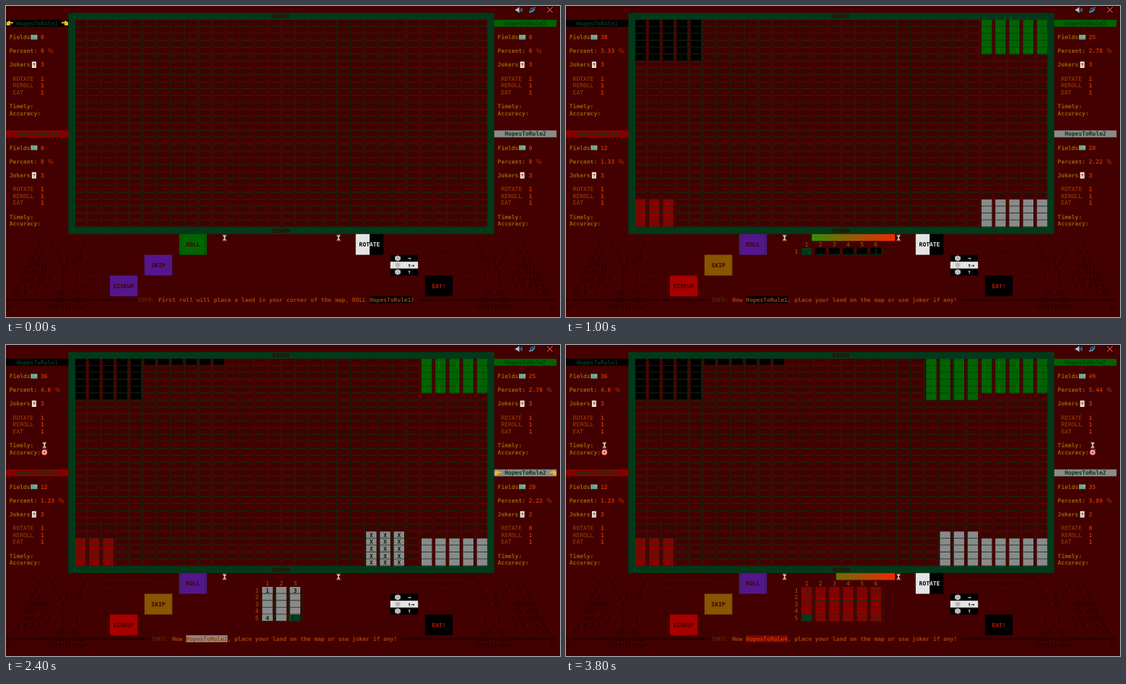
Recreate the animation shown at these times as an HTML page with a canvas. Size 768 px wide and 432 px high, loop 4000 ms.

```html
<!DOCTYPE html>
<html lang="en">
<head>
<meta charset="utf-8">
<title>Land game</title>
<style>
html, body { margin: 0; width: 100%; height: 100%; overflow: hidden; background: #430000; }
canvas { display: block; width: 768px; height: 432px; }
</style>
</head>
<body>
<canvas id="stage" width="768" height="432"></canvas>
<script>
const ctx = document.getElementById('stage').getContext('2d');
const CW = 4.8, CH = 9.6, COLS = 159, LOOP = 4000;
const BG = '#430000', GREEN = '#003a1a', LABEL = '#9a6000', VALUE = '#c83200', TEXT = '#a84000';
const INK = '#000000', PURPLE = '#54168c';
const COLOR = { 1: '#000000', 2: '#8a8a8a', 3: '#006400', 4: '#860000' };
const FONT = '7.973px "DejaVu Sans Mono", monospace';
const nameOf = n => 'HopesToRule' + n;

// owner, column, row, width, height, time placed
const blocks = [
  [1, 0, 0, 5, 6, 200], [2, 25, 26, 5, 4, 400], [3, 25, 0, 5, 5, 600], [4, 0, 26, 3, 4, 800],
  [1, 5, 0, 6, 1, 1200], [2, 22, 25, 3, 5, 2800], [3, 21, 0, 4, 6, 3400]
];
// time, player, rolled size, elapsed timer steps, pointer shown, preview column
const turns = [
  [0, 1, null, -1, true], [200, 2, null, -1, true], [400, 3, null, -1, true], [600, 4, null, -1, true],
  [800, 1, null, 0, true], [1000, 1, [6, 1], 1, false],
  [1200, 2, null, 0, true], [1600, 2, [5, 3], 3, true], [1800, 2, [5, 3], 4, true],
  [2000, 2, [3, 5], -1, true], [2200, 2, [3, 5], -1, true, 20],
  [2400, 2, [3, 5], -1, true, 21], [2600, 2, [3, 5], -1, true, 22],
  [2800, 3, null, 0, true], [3200, 3, [4, 6], 1, false],
  [3400, 4, null, 0, true], [3800, 4, [6, 5], 2, false]
];
const ROTATED_AT = 2000;

const scenery = String.raw`          .-.          .------------------------
         /   \        /    ---------------
        / /   \  __  /    -----------
       / /     \ (__)/   ---------
      //////    \/ '    ---------
     //// //    :   :  ------
    //// // /   |   | ----
   / / / / /    '   '---
  // /  /      //..\\

//          '///||||\\\'`.split('\n');
const SWAP = { '/': '\\', '\\': '/', '(': ')', ')': '(' };
const mirror = s => [...s.padEnd(COLS)].reverse().map(c => SWAP[c] || c).join('');
const feet = '='.repeat(14) + 'UU====UU';
const ground = feet.padEnd(COLS - feet.length, '=') + mirror(feet).trim();

function box(col, row, w, h, color) {
  ctx.fillStyle = color;
  ctx.fillRect(col * CW, row * CH, w * CW, h * CH);
}
function text(s, col, row, color, weight = 'bold') {
  ctx.font = weight + ' ' + FONT;
  ctx.fillStyle = color;
  ctx.fillText(s, col * CW, row * CH + 7.6);
}
function poly(points, color) {
  ctx.fillStyle = color;
  ctx.beginPath();
  for (let i = 0; i < points.length; i += 2) ctx.lineTo(points[i], points[i + 1]);
  ctx.fill();
}
function disc(x, y, r, color) {
  ctx.fillStyle = color;
  ctx.beginPath();
  ctx.arc(x, y, r, 0, Math.PI * 2);
  ctx.fill();
}
function stroke(points, color, width) {
  ctx.strokeStyle = color;
  ctx.lineWidth = width;
  ctx.beginPath();
  for (let i = 0; i < points.length; i += 2) ctx.lineTo(points[i], points[i + 1]);
  ctx.stroke();
}
function icon(draw, x, y, flip = 1) {
  ctx.save();
  ctx.translate(x, y);
  ctx.scale(flip, 1);
  draw();
  ctx.restore();
}

const icons = {
  hand() {
    ctx.fillStyle = '#f5b82a';
    ctx.fillRect(-4.5, -2, 5, 5);
    ctx.fillRect(-1, -1.7, 5.6, 1.9);
    poly([-3, -2, -0.5, -3.9, 0.6, -3, -0.5, -1], '#f5b82a');
    stroke([-0.5, 0.8, 1.5, 0.8], '#c47d10', 0.6);
    stroke([-0.5, 2, 1, 2], '#c47d10', 0.6);
  },
  map() {
    ctx.fillStyle = '#5fa9b8';
    ctx.fillRect(-4.6, -3.2, 9.2, 6.6);
    poly([-4, -2.5, -0.6, -2.5, -1.4, 0.2, -2.6, 2.4], '#8fb565');
    poly([0, -2, 4, -2.6, 3.4, 0.2, 1.4, 2], '#b7b75c');
    stroke([-1.5, -3.2, -1.5, 3.4], '#356c80', 0.4);
    stroke([1.6, -3.2, 1.6, 3.4], '#356c80', 0.4);
  },
  card() {
    ctx.fillStyle = '#e6e2de';
    ctx.fillRect(-3, -4.4, 6, 8.8);
    poly([-1.8, -1, 0, -2.8, 1.8, -1, 1, 1], '#b8554a');
    disc(0, 1.2, 1.2, '#c9a36a');
  },
  glass() {
    poly([-2.6, -3.6, 2.6, -3.6, 0.4, 0, 2.6, 3.6, -2.6, 3.6, -0.4, 0], '#d9d3cc');
    poly([-1.7, 3.2, 0, 1.2, 1.7, 3.2], '#e0a040');
    stroke([-3, -4, 3, -4], '#9a5c40', 1);
    stroke([-3, 4, 3, 4], '#9a5c40', 1);
  },
  target() {
    disc(0, 0.3, 4.3, '#d8302a');
    disc(0, 0.3, 3, '#eeeeee');
    disc(0, 0.3, 1.8, '#d8302a');
    stroke([0, 0.3, 4, -3.8], '#4a9ac8', 0.9);
  },
  die() {
    poly([0, -4, 3.8, -2.2, 3.8, 2.2, 0, 4, -3.8, 2.2, -3.8, -2.2], '#d8d8d8');
    stroke([-3.8, -2.2, 0, -0.4, 3.8, -2.2], '#8c8c8c', 0.6);
    stroke([0, -0.4, 0, 4], '#8c8c8c', 0.6);
    disc(0, -2.2, 0.6, '#702020');
    disc(-1.9, 1, 0.6, '#404040');
    disc(1.9, 1, 0.6, '#404040');
  },
  speaker() {
    poly([-4.5, -1.6, -2.6, -1.6, 0.6, -4.2, 0.6, 4.2, -2.6, 1.6, -4.5, 1.6], '#a9c4d4');
    ctx.strokeStyle = '#3f9fd8';
    ctx.lineWidth = 1;
    for (const r of [2, 3.8]) {
      ctx.beginPath();
      ctx.arc(0.6, 0, r, -0.9, 0.9);
      ctx.stroke();
    }
  },
  notes() {
    stroke([-2.5, 2.6, -2.5, -2, 0.3, -2.8, 0.3, 1.8], '#3d9ccc', 0.9);
    stroke([2.3, 0, 2.3, -4, 4, -2.8], '#3d9ccc', 0.9);
    disc(-3.4, 2.8, 1.3, '#3d9ccc');
    disc(-0.6, 2, 1.3, '#3d9ccc');
    disc(1.5, 0.2, 1.2, '#3d9ccc');
  },
  cross() {
    ctx.fillStyle = '#180000';
    ctx.fillRect(-5, -5, 10.4, 9.6);
    stroke([-3.8, -3.8, 3.8, 3.8], '#e02a2a', 1.7);
    stroke([3.8, -3.8, -3.8, 3.8], '#e02a2a', 1.7);
  }
};

function cell(col, row, color) {
  if (color) box(col, row, 3, 1, color);
  ctx.fillStyle = GREEN;
  ctx.fillRect(col * CW, row * CH + 8.7, 3 * CW, 0.9);
}
function divider(col, row, h) {
  ctx.fillStyle = GREEN;
  ctx.fillRect((col + 3.5) * CW - 0.35, row * CH, 0.7, h * CH);
}

function board(t, turn) {
  box(18, 1, 123, 32, GREEN);
  box(20, 2, 119, 30, BG);
  text('BOARD', 77, 1, BG);
  text('BOARD', 77, 32, BG);
  for (let c = 0; c < 30; c++) {
    for (let r = 0; r < 30; r++) cell(20 + c * 4, 2 + r);
    if (c < 29) divider(20 + c * 4, 2, 30);
  }
  const fill = (owner, c0, r0, w, h, mark) => {
    for (let c = c0; c < c0 + w; c++) for (let r = r0; r < r0 + h; r++) {
      cell(20 + c * 4, 2 + r, COLOR[owner]);
      if (mark) text(mark, 21 + c * 4, 2 + r, '#101a10');
    }
  };
  for (const [owner, c, r, w, h, at] of blocks) if (t >= at) fill(owner, c, r, w, h);
  const [, who, size, , , preview] = turn;
  if (preview) fill(who, preview, 30 - size[1], size[0], size[1], 'X');
}

function percent(fields) {
  const v = +(fields / 9).toFixed(2);
  return v && Number.isInteger(v) ? v.toFixed(1) : String(v);
}

function panel(n, col, row, t, turn) {
  const mine = blocks.filter(b => b[0] === n && t >= b[5]);
  const fields = mine.reduce((sum, b) => sum + b[3] * b[4], 0);
  const spent = n === 2 && t >= ROTATED_AT ? 1 : 0;
  const at = (c, r) => [(col + c) * CW, (row + r + 0.5) * CH];

  box(col, row, 18, 1, COLOR[n]);
  text(nameOf(n), col + 3, row, GREEN);
  if (turn[1] === n && turn[4]) {
    icon(icons.hand, ...at(1.1, 0));
    icon(icons.hand, ...at(17, 0), -1);
  }
  const line = (r, label, value, color = LABEL, indent = 1, weight) => {
    text(label, col + indent, row + r, color, weight);
    text(String(value), col + 10, row + r, VALUE);
  };
  const share = percent(fields);
  line(2, 'Fields', fields);
  line(4, 'Percent:', share);
  ctx.font = '8px "Noto Sans CJK JP", "Noto Sans CJK", sans-serif';
  ctx.fillText('％', (col + 11.1 + share.length) * CW, (row + 4) * CH + 7.6);
  line(6, 'Jokers', 3 - spent);
  line(8, 'ROTATE', 1 - spent, TEXT, 2, 'normal');
  line(9, 'REROLL', 1, TEXT, 2, 'normal');
  line(10, 'EAT', 1, TEXT, 2, 'normal');
  line(12, 'Timely:', '');
  line(13, 'Accuracy:', '');
  icon(icons.map, ...at(8.1, 2));
  icon(icons.card, ...at(8.1, 6));
  if (mine.length > 1 && n !== 2) {
    icon(icons.glass, ...at(11.1, 12));
    icon(icons.target, ...at(11.1, 13));
  }
}

function button(label, col, row, color, ink = BG) {
  box(col, row, 8, 3, color);
  text(label, col + (8 - label.length) / 2, row + 1, ink);
}

function controls(t, turn) {
  const [, who, size] = turn;
  button('ROLL', 50, 33, size ? PURPLE : COLOR[3]);
  for (let i = 0; i < 3; i++) {
    text('|', 50, 33 + i, GREEN, 'normal');
    text('|', 57, 33 + i, GREEN, 'normal');
  }
  button('SKIP', 40, 36, size ? '#865600' : PURPLE);
  button('GIVEUP', 30, 39, size ? '#a60000' : PURPLE);
  if (!(who === 2 && t >= ROTATED_AT)) {
    box(101, 33, 4, 3, '#e4e4e4');
    box(105, 33, 4, 3, '#000');
    text('ROT', 102, 34, '#000');
    text('ATE', 105, 34, '#e4e4e4');
  }
  ['→', '↑→', '↑'].forEach((arrows, i) => {
    const light = i === 1;
    box(111, 36 + i, 8, 1, light ? '#e4e4e4' : '#000');
    icon(icons.die, 543, (36.5 + i) * CH);
    text(arrows, 116, 36 + i, light ? '#000' : '#e4e4e4');
  });
  button('EAT!', 121, 39, '#000', '#b41c00');
}

function timer(step) {
  if (step >= 0) {
    const g = ctx.createLinearGradient(64 * CW, 0, 95 * CW, 0);
    g.addColorStop(0, '#00b000');
    g.addColorStop(0.5, '#7c6800');
    g.addColorStop(1, '#f02800');
    box(64 + step * 7, 33, 31 - step * 7, 1, g);
  }
  icon(icons.glass, 303, 322);
  icon(icons.glass, 461, 322);
}

function rolled(who, [w, h]) {
  const left = 80 - 2 * w, top = 35;
  for (let c = 0; c < w; c++) {
    text(String(c + 1), left + 1 + c * 4, top - 1, LABEL, 'normal');
    for (let r = 0; r < h; r++) cell(left + c * 4, top + r, COLOR[who]);
    divider(left + c * 4, top, h);
  }
  for (let r = 0; r < h; r++) text(String(r + 1), left - 2, top + r, LABEL, 'normal');
  const corner = { 1: [0, 0], 3: [w - 1, 0], 4: [0, h - 1], 2: [w - 1, h - 1] };
  const spot = n => [left + corner[n][0] * 4, top + corner[n][1]];
  for (const n of [1, 3, 4, 2]) {
    const [c, r] = spot(n);
    cell(c, r, COLOR[who]);
    text(String(n), c + 1, r, who === 2 ? '#101a10' : GREEN);
  }
  cell(...spot(who), GREEN);
}

function info(t, turn) {
  const [, who, size] = turn;
  const [before, after] = size
    ? ['Now ', ', place your land on the map or use joker if any!']
    : t < 800
      ? ['First roll will place a land in your corner of the map, ROLL ', '!']
      : ['It is your turn ', ', ROLL!'];
  const name = nameOf(who), length = 6 + before.length + name.length + after.length;
  const start = Math.floor((156 - length) / 2), end = start + length + 1;
  text(ground.slice(0, start), 0, 42, INK, 'normal');
  text(ground.slice(end), end, 42, INK, 'normal');
  text('INFO:', start, 42, '#5c3000', 'normal');
  let col = start + 6;
  text(before, col, 42, TEXT);
  col += before.length;
  box(col, 42, name.length, 1, COLOR[who]);
  text(name, col, 42, TEXT);
  text(after, col + name.length, 42, TEXT);
}

function render(t) {
  const turn = turns.filter(s => s[0] <= t).pop();
  box(0, 0, 160, 45, BG);
  scenery.forEach((s, i) => {
    text(s, 0, 33 + i, INK, 'normal');
    text(mirror(s), 0, 33 + i, INK, 'normal');
  });
  board(t, turn);
  panel(1, 0, 2, t, turn);
  panel(4, 0, 18, t, turn);
  panel(3, 141, 2, t, turn);
  panel(2, 141, 18, t, turn);
  icon(icons.speaker, 711, 5.5);
  icon(icons.notes, 730, 5.5);
  icon(icons.cross, 754, 5.3);
  controls(t, turn);
  timer(turn[3]);
  if (turn[2]) rolled(turn[1], turn[2]);
  info(t, turn);
}

const began = performance.now();
function tick() {
  render((performance.now() - began) % LOOP);
  requestAnimationFrame(tick);
}
tick();
</script>
</body>
</html>
```
